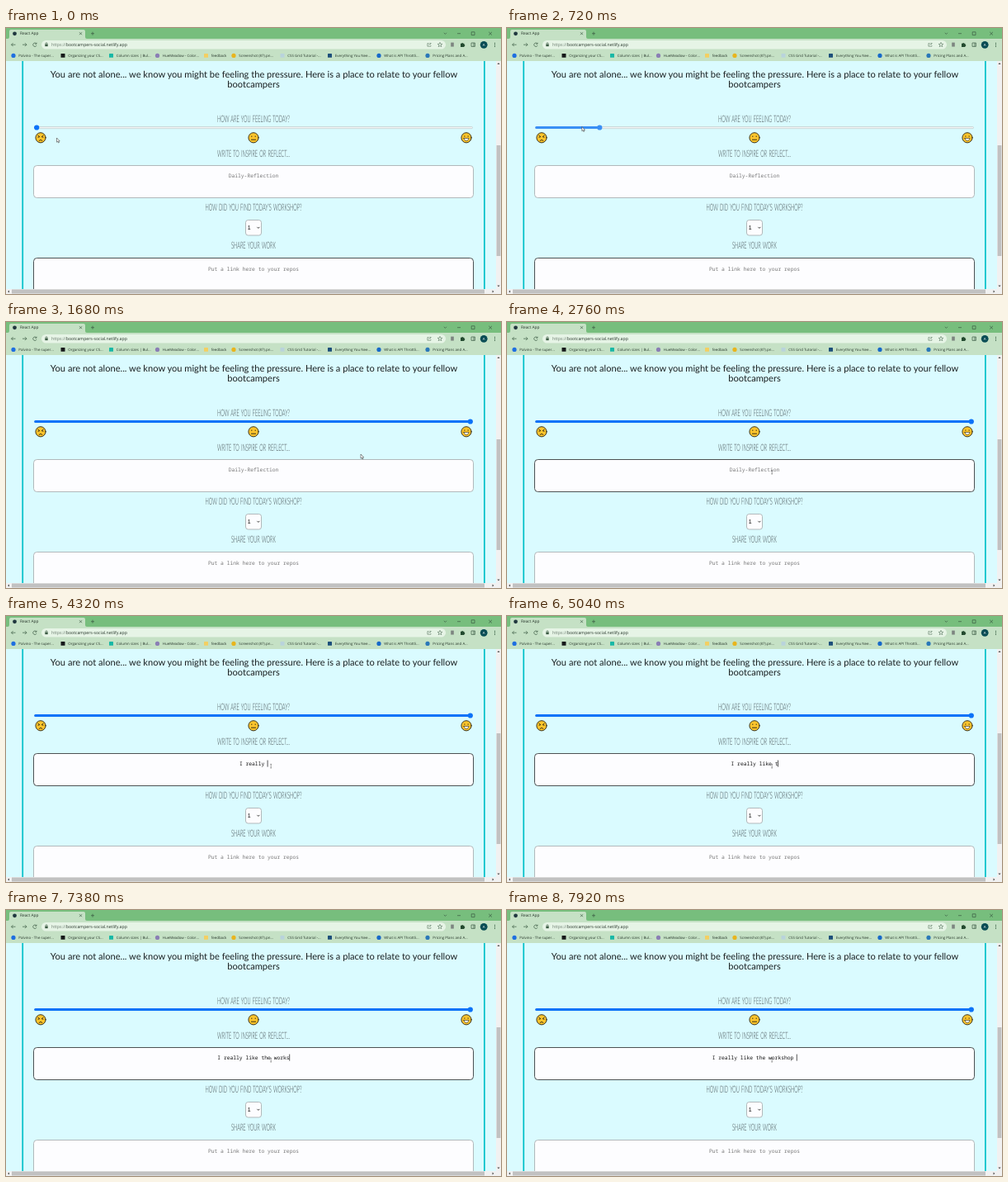
These frames come from a looping animation (600x322 px, 8000 ms). An HTML page:

```html
<!DOCTYPE html>
<html lang="en">
<head>
<meta charset="utf-8">
<title>Daily reflection form</title>
<style>
  html, body { margin: 0; width: 600px; height: 322px; overflow: hidden; }
  svg { display: block; text-rendering: geometricPrecision; }
  .ui { font: 4.4px "Open Sans", "Noto Sans", sans-serif; fill: #26352a; }
  .lead { font: 11.1px Lato, sans-serif; fill: #1a1f20; text-anchor: middle; }
  .label { font: 300 11.6px Lato, sans-serif; word-spacing: 1.5px; fill: #3c4446; text-anchor: middle; }
  .mono { font: 6.33px "Noto Sans Mono", "DejaVu Sans Mono", monospace; fill: #111; }
  .hint { fill: #757575; text-anchor: middle; }
  .field { fill: #fdfdff; stroke: #a3a8aa; stroke-width: .8; }
  .field.focus { stroke: #3a3e40; stroke-width: .9; }
  .line { fill: none; stroke: #3a5a42; stroke-width: .7; }
</style>
</head>
<body>
<svg width="600" height="322" viewBox="0 0 600 322">
  <defs>
    <circle id="face" r="6.1" fill="#fcc42c" stroke="#2b2412" stroke-width=".9"/>
  </defs>

  <!-- page -->
  <rect width="600" height="322" fill="#dafbff"/>
  <path d="M20.2 40V316M579.9 40V316" stroke="#0cc3cb" stroke-width="1.8"/>
  <text class="lead" x="300.5" y="60.3">You are not alone... we know you might be feeling the pressure. Here is a place to relate to your fellow</text>
  <text class="lead" x="300" y="72.3">bootcampers</text>
  <g id="labels"></g>

  <rect x="34.5" y="119.5" width="531" height="2.2" rx="1.1" fill="#f3f5f5" stroke="#b8c1c3" stroke-width=".6"/>
  <rect id="fill" x="34.2" y="119" height="3" rx="1.5"/>
  <circle id="thumb" cy="120.5" r="3.1"/>

  <g fill="none" stroke="#2b2412" stroke-width=".9" stroke-linecap="round">
    <use href="#face" x="42" y="132.8"/>
    <path d="M38.8 130.3l2 1.3-1.8.7M45.2 130.3l-2 1.3 1.8.7M40 136.4q2-2.4 4 0"/>
    <use href="#face" x="300" y="132.8"/>
    <path d="M297.8 131v.6M302.2 131v.6M297.4 135.2h5.2"/>
    <use href="#face" x="558" y="132.8"/>
    <path d="M555.9 130.8v.6M560.1 130.8v.6"/>
    <path d="M554.9 133.5h6.2q-.6 3-3.1 3t-3.1-3z" fill="#fff" stroke-width=".6"/>
  </g>

  <rect id="note" class="field" x="33.5" y="166.5" width="533" height="39" rx="4"/>
  <text id="noteHint" class="mono hint" x="300" y="181.1">Daily-Reflection</text>
  <text id="typed" class="mono" y="181.1"></text>
  <path id="caret" d="M0 174.6v8" stroke="#111" stroke-width=".7"/>

  <rect class="field" x="290.5" y="232.5" width="19" height="18.5" rx="3"/>
  <text x="292.8" y="244.3" font-family="'Liberation Sans', Arial, sans-serif" font-size="7">1</text>
  <path d="M304.4 240.9l1.5 1.5 1.5-1.5" fill="none" stroke="#111" stroke-width=".8"/>

  <rect id="share" class="field" x="33.5" y="278.5" width="533" height="44" rx="4"/>
  <text class="mono hint" x="300" y="294.4">Put a link here to your repos</text>

  <!-- scrollbars -->
  <path d="M594 40h6v282H0v-6h594z" fill="#f1f1f1"/>
  <path d="M594.6 142h4.8v134h-4.8zM7 316.6h573v4.8H7z" fill="#c1c1c1"/>
  <path d="M595.4 44l1.6-2 1.6 2zM595.4 311.5l1.6 2 1.6-2zM4 317.4l-2 1.6 2 1.6zM589.5 317.4l2 1.6-2 1.6z" fill="#555"/>

  <!-- browser -->
  <rect width="600" height="40" fill="#c5e1c5"/>
  <path d="M0 0h600v13H98q-2 0-2-2V4q0-2-2-2H6Q4 2 4 4v7q0 2-2 2H0z" fill="#77be7d"/>
  <circle cx="10.5" cy="6.8" r="2.4" fill="#20373f"/>
  <rect x="43" y="15" width="490" height="10.6" rx="5.3" fill="#e6f4e6"/>
  <g class="line">
    <path d="M89 5.2l3 3m0-3l-3 3M103 6.7h4m-2-2v4"/>
    <path d="M530.8 5.8l1.6 1.6 1.6-1.6M547 6.7h4M564.2 4.8h3.8v3.8h-3.8zM585.2 4.8l3.8 3.8m0-3.8l-3.8 3.8"/>
    <path d="M11.5 20.2h-5m2-2l-2 2 2 2M20 20.2h5m-2-2l2 2-2 2M36.7 18.9a2.2 2.2 0 1 0 .3 2.2m0-3.4v1.6h-1.7"/>
    <path d="M48 19.7v-.9a1 1 0 0 1 2 0v.9"/>
    <path d="M512.5 18.6h-1.6v3.6h4v-1.2M512.5 20.6q.2-1.8 2.6-1.8m-1-1.1l1.1 1.1-1.1 1.1" stroke-width=".5"/>
    <path d="M526 17.4l.8 1.9 2 .1-1.6 1.3.6 2-1.8-1.1-1.8 1.1.6-2-1.6-1.3 2-.1z" stroke-width=".5"/>
    <path d="M564 18h4.4v4.4H564zM566.9 18v4.4"/>
  </g>
  <path d="M47.3 19.6h3.4v2.6h-3.4z" fill="#3a5a42"/>
  <path d="M539.2 17.6h3.6v5h-3.6z" fill="#7d8580"/>
  <path d="M551 18.8h1.3a.9.9 0 0 1 1.8 0h1.3v1.3a.9.9 0 0 1 0 1.8v1h-4.4z" fill="#234a2f"/>
  <circle cx="579.2" cy="20.3" r="4.4" fill="#084c54"/>
  <text class="ui" x="579.2" y="21.9" text-anchor="middle" style="fill:#fff">A</text>
  <g fill="#234a2f"><circle cx="592.5" cy="18.3" r=".6"/><circle cx="592.5" cy="20.3" r=".6"/><circle cx="592.5" cy="22.3" r=".6"/></g>
  <text class="ui" x="17" y="8.4" style="font-size:4.8px">React App</text>
  <text class="ui" x="55" y="22" style="font-size:5.2px"><tspan fill="#6a7a6e">https://</tspan>bootcampers-social.netlify.app</text>
  <g id="bookmarks"></g>

  <!-- pointers -->
  <path id="arrow" d="M0 0v5.2l1.2-1 .8 1.8.9-.4-.8-1.7h1.6z" fill="#fff" stroke="#222" stroke-width=".5"/>
  <path id="beam" d="M-.9-2.3h1.8M0-2.3v4.6M-.9 2.3h1.8" fill="none" stroke="#444" stroke-width=".5"/>
</svg>
<script>
const LOOP = 8000, STEP = 60, CHAR = 3.8;
const $ = id => document.getElementById(id);

$('labels').innerHTML = [
  [113.8, 'HOW ARE YOU FEELING TODAY?'],
  [156, 'WRITE TO INSPIRE OR REFLECT...'],
  [221.4, "HOW DID YOU FIND TODAY'S WORKSHOP?"],
  [267.4, 'SHARE YOUR WORK']
].map(([y, s]) => `<text class="label" transform="translate(300 ${y}) scale(.485 1)">${s}</text>`).join('');

const dot = (x, color) => `<circle cx="${x}" cy="33.4" r="2.6" fill="${color}"/>`;
const square = (x, color) => `<rect x="${x - 2.5}" y="31" width="5" height="4.8" rx=".6" fill="${color}"/>`;
$('bookmarks').innerHTML = [
  [9, dot, '#1f6fe0', 'Palvino - The super...'],
  [69, square, '#16191a', 'Organizing your CS...'],
  [127.5, square, '#19b8a6', 'Column sizes | Bul...'],
  [183.5, dot, '#8a7fb5', 'HueMeadow - Color...'],
  [242.5, square, '#f3cf62', 'feedback'],
  [276, dot, '#e8b51e', 'Screenshot (87).pn...'],
  [335, square, '#b9d3dc', 'CSS Grid Tutorial -...'],
  [392.5, square, '#1d4f7a', 'Everything You Nee...'],
  [452, dot, '#1769c9', 'What is API Throttli...'],
  [511, dot, '#2a78b8', 'Pricing Plans and A...']
].map(([x, icon, color, s]) => icon(x, color) + `<text class="ui" x="${x + 6.3}" y="35">${s}</text>`).join('');

// Each stop is [time, ...values]; values run linearly between stops.
function follow(stops, t) {
  const i = stops.findIndex(s => s[0] > t);
  if (i === 0) return stops[0].slice(1);
  if (i < 0) return stops[stops.length - 1].slice(1);
  const a = stops[i - 1], b = stops[i], k = (t - a[0]) / (b[0] - a[0]);
  return a.slice(1).map((v, j) => v + (b[j + 1] - v) * k);
}

const pointerPath = [
  [0, 61.5, 133], [240, 50, 127], [480, 37, 119.5], [660, 37, 119.5], [1200, 521.5, 119.5],
  [1320, 572, 122], [1440, 558, 126], [1680, 430, 160], [1980, 321.2, 181.7]
];
const thumbPath = [[640, 37.2], [1200, 562.8]];
const phrase = 'I really like the workshop ';
const keyTimes = [
  3120, 3300, 3600, 3660, 3780, 3960, 4020, 4200, 4320, 4500, 4620, 4740, 4800, 4920,
  5040, 5220, 5460, 5640, 6720, 6900, 7080, 7200, 7380, 7560, 7680, 7800, 7920
];
const caretHidden = [[0, 1860], [2160, 2460], [2760, 3120], [5940, 6300], [6660, 6720]];

function draw(now) {
  const t = Math.floor(now % LOOP / STEP) * STEP;

  const [thumbX] = follow(thumbPath, t);
  const blue = t >= 540 && t < 1380 ? '#3a8ff5' : '#0a72f8';
  $('thumb').setAttribute('cx', thumbX);
  $('thumb').setAttribute('fill', blue);
  $('fill').setAttribute('width', thumbX - 34.2);
  $('fill').setAttribute('fill', blue);

  $('share').classList.toggle('focus', t < 1440);
  $('note').classList.toggle('focus', t >= 1860);

  const count = keyTimes.filter(k => k <= t).length;
  const half = count * CHAR / 2;
  $('noteHint').style.display = count ? 'none' : '';
  $('typed').textContent = phrase.slice(0, count);
  $('typed').setAttribute('x', 300 - half);
  $('caret').setAttribute('transform', `translate(${300 + half} 0)`);
  $('caret').style.display = caretHidden.some(([a, b]) => t >= a && t < b) ? 'none' : '';

  const [x, y] = follow(pointerPath, t);
  const overNote = y > 166;
  for (const id of ['arrow', 'beam']) $(id).setAttribute('transform', `translate(${x} ${y})`);
  $('arrow').style.display = overNote ? 'none' : '';
  $('beam').style.display = overNote ? '' : 'none';
}

const start = performance.now();
function tick() {
  draw(performance.now() - start);
  requestAnimationFrame(tick);
}
tick();
</script>
</body>
</html>
```
